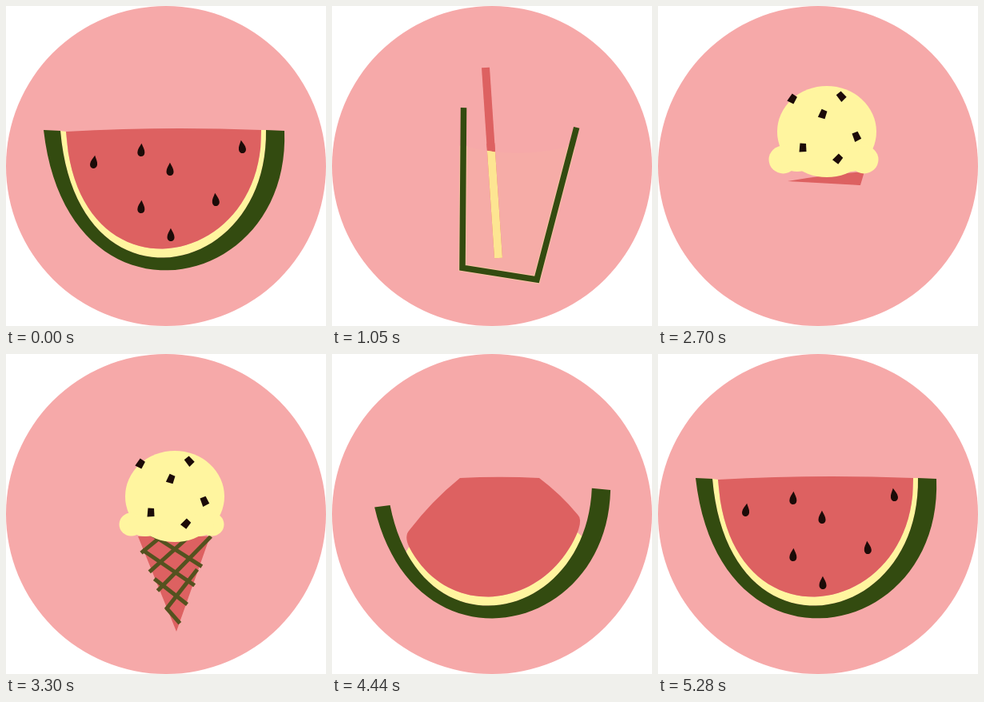
Write an HTML page with a canvas that moves like this. It is 400 by 400 pixels and loops after 5520 ms.

```html
<!DOCTYPE html>
<html lang="en">
<head>
<meta charset="utf-8">
<title>Summer treats</title>
<style>
  html, body { margin: 0; width: 100%; height: 100%; overflow: hidden; background: #fff; }
  canvas { display: block; width: 100vmin; height: 100vmin; }
</style>
</head>
<body>
<canvas id="stage" width="400" height="400"></canvas>
<script>
const ctx = document.getElementById('stage').getContext('2d');
const LOOP = 5520;
const PINK = '#f6a9a9', RED = '#dd6161', GREEN = '#334b10', CREAM = '#fff59f', DARK = '#1c0b08';
const STRAW_WET = '#fde592', WAFFLE = '#54521f';

// Bezier curves from the right tip to the left tip.
const RIND = [[348, 156], [356, 362], [76, 414], [47, 155]];
const LINER = [[325, 155], [328, 344], [88, 390], [68, 156]];
const FLESH = [[319, 155], [322, 332], [88, 372], [75, 157]];

const SEEDS = [[110, 195], [169, 180], [205, 204], [295, 176], [169, 251], [262, 242], [206, 286]];
const CHIPS = [[168, 137, 30], [229, 134, -42], [206, 156, 20], [181, 198, 0], [248, 184, -25], [225, 212, 40]];

// Timing
const ramp = (t, a, b) => Math.min(1, Math.max(0, (t - a) / (b - a)));
const ease = (t, a, b) => (1 - Math.cos(Math.PI * ramp(t, a, b))) / 2;
const bump = (t, a, b) => Math.sin(Math.PI * ramp(t, a, b));
function overshoot(t, a, b, amount = 1.7) {
  const k = ramp(t, a, b) - 1;
  return 1 + (amount + 1) * k ** 3 + amount * k * k;
}

// Geometry
const lerp = (a, b, k) => a + (b - a) * k;
const mix = (p, q, k) => p.map((v, i) => lerp(v, q[i], k));

function bezier([a, b, c, d], s) {
  const ab = mix(a, b, s), bc = mix(b, c, s), cd = mix(c, d, s);
  return mix(mix(ab, bc, s), mix(bc, cd, s), s);
}

function sample(fn, from, to, count = 48) {
  return Array.from({ length: count + 1 }, (_, i) => fn(lerp(from, to, i / count)));
}

// Drawing
function trace(points) {
  ctx.beginPath();
  points.forEach(p => ctx.lineTo(...p));
}

function fill(points, color) {
  trace(points);
  ctx.fillStyle = color;
  ctx.fill();
}

function stroke(points, color, width) {
  trace(points);
  ctx.strokeStyle = color;
  ctx.lineWidth = width;
  ctx.stroke();
}

function ellipse(x, y, rx, ry) {
  ctx.beginPath();
  ctx.ellipse(x, y, rx, ry, 0, 0, 7);
  ctx.fill();
}

function placed(x, y, degrees, size, draw) {
  if (size <= 0) return;
  ctx.save();
  ctx.translate(x, y);
  ctx.rotate(degrees * Math.PI / 180);
  ctx.scale(size, size);
  draw();
  ctx.restore();
}

function inside(path, draw) {
  ctx.save();
  ctx.clip(path);
  draw();
  ctx.restore();
}

function bulgeTo(p, q, amount) {
  const [mx, my] = mix(p, q, .5);
  ctx.quadraticCurveTo(mx + (q[1] - p[1]) * amount, my - (q[0] - p[0]) * amount, ...q);
}

// Hidden share of a curve at its [left, right] ends: closed, partly open, then whole.
function hidden(t, begin, partial, end) {
  if (t < 1000) return [.5, .5].map(v => v * ease(t, 100, 430));
  return mix([.5, .5], partial, ease(t, begin, 4440)).map(v => v * (1 - ease(t, 4440, end)));
}

function band(outer, inner, [left, right], color) {
  if (right + left >= 1) return;
  const edge = curve => sample(s => bezier(curve, s), right, 1 - left);
  fill([...edge(outer), ...edge(inner).reverse()], color);
}

// Top edge [x, y, x, y], apex and how far the cone has spread into a melon slice.
function fleshPose(t) {
  const slice = [75, 157, 319, 155];
  if (t < 430) {
    return { top: mix(slice, [202, 303, 202, 303], ease(t, 120, 430)), apex: [202, 303], spread: 1 };
  }
  const speck = Array(6).fill(212), sliver = [162, 219, 258, 207, 253, 224], cone = [165, 228, 255, 228, 213, 347];
  const grown = mix(mix(speck, sliver, ease(t, 2550, 2700)), cone, overshoot(t, 2740, 3120, .9));
  const spread = ease(t, 3600, 4050);
  const raised = mix(grown.slice(0, 4), [160, 155, 259, 155], spread);
  return { top: mix(raised, slice, ease(t, 4440, 4670)), apex: grown.slice(4), spread };
}

function drawFlesh(t) {
  if (t > 430 && t < 2550) return;
  const { top, apex, spread } = fleshPose(t);
  const [left, right] = hidden(t, 3700, [.128, .105], 4670);
  const arc = sample(s => mix(apex, bezier(FLESH, s), spread), right, 1 - left);
  const n = arc.length - 1;
  const tl = top.slice(0, 2), tr = top.slice(2);
  const shoulderR = mix(arc[0], tr, .1), shoulderL = mix(arc[n], tl, .1);
  ctx.beginPath();
  ctx.moveTo(...tl);
  bulgeTo(tl, tr, .024);
  bulgeTo(tr, shoulderR, .06 * spread);
  ctx.quadraticCurveTo(...arc[0], ...arc[2]);
  arc.slice(2, n - 1).forEach(p => ctx.lineTo(...p));
  ctx.quadraticCurveTo(...arc[n], ...shoulderL);
  bulgeTo(shoulderL, tl, .06 * spread);
  ctx.fillStyle = RED;
  ctx.fill();
}

function drawRind(t) {
  const flare = bump(t, 4720, 4980);
  const bend = ([a, b, c, [x, y]]) => [a, b, c, [x - 17 * flare, y - 18 * flare]];
  const ends = t < 1000 ? [0, 0] : hidden(t, 3950, [.05, .023], 4620);
  band(bend(RIND), bend(LINER), ends, GREEN);
}

function drawSeeds(t) {
  SEEDS.forEach(([x, y], i) => {
    const delay = i * 25;
    const size = t < 1000 ? 1 - ease(t, 60 + delay / 2, 230 + delay / 2) : overshoot(t, 4740 + delay, 5060 + delay);
    placed(x, y, (200 - x) * .09, size, () => {
      ctx.beginPath();
      ctx.moveTo(0, -8.3);
      ctx.bezierCurveTo(2, -4, 4.5, -1, 4.5, 3);
      ctx.bezierCurveTo(4.5, 9.8, -4.5, 9.8, -4.5, 3);
      ctx.bezierCurveTo(-4.5, -1, -2, -4, 0, -8.3);
      ctx.fillStyle = DARK;
      ctx.fill();
    });
  });
}

// The glass leans while it forms, springs upright, and opens before it leaves.
function glassAt(t) {
  const after = Math.max(0, t - 1050);
  const lean = ease(t, 600, 1050) * Math.exp(-after / 80) * Math.cos(after / 60);
  const open = 20 * ramp(t, 1650, 2050) ** 2 * (1 - ease(t, 2050, 2200));
  return {
    lean,
    width: 9 - 1.5 * lean,
    corners: [[284 + 22 * lean + open, 141 + 11 * lean], [256, 342],
              [163, 342 - 15 * lean], [128 + 37 * lean - open, 138 - 11 * lean]]
  };
}

function drawGlass(t, { corners, width }) {
  const morph = ease(t, 150, 640);
  const cut = .1 * (ease(t, 150, 600) - ease(t, 600, 850)) + .5 * ease(t, 2000, 2400);
  if (cut >= .5) return;
  const wall = s => {
    const i = Math.min(2, Math.floor(s * 3 + 1e-6));
    return mix(corners[i], corners[i + 1], s * 3 - i);
  };
  const point = s => mix(mix(bezier(RIND, s), bezier(LINER, s), .5), wall(s), morph);
  const base = cut < 1 / 3 ? corners.slice(1, 3) : [];
  const points = morph < 1 ? sample(point, cut, 1 - cut) : [point(cut), ...base, point(1 - cut)];
  stroke(points, GREEN, lerp(19, width, morph));
}

function liquidAt(t, { lean, corners: [rightRim, rightBase, leftBase, leftRim] }) {
  const level = .7 * ease(t, 800, 1050) * (1 - ease(t, 1780, 2260));
  const l = mix(leftBase, leftRim, level * (1.02 + .07 * lean));
  const r = mix(rightBase, rightRim, level * (.98 + .28 * lean));
  const dip = 18 * ramp(level, 0, .3);
  const path = new Path2D();
  path.moveTo(...l);
  path.quadraticCurveTo((l[0] + r[0]) / 2, (l[1] + r[1]) / 2 + dip, ...r);
  path.lineTo(...rightBase);
  path.lineTo(...leftBase);
  path.closePath();
  const alpha = level > 0 ? .04 + .41 * ease(t, 1060, 1300) : 0;
  return { path, alpha, sides: [l, leftBase, rightBase, r] };
}

function drawStraw(t, color) {
  const straight = [208, 315, 199, 182, 192, 77], bent = [211, 336, 275, 130, 327, 107];
  const bend = overshoot(t, 1070, 1400);
  const hop = 14 * bump(t, 1880, 2140);
  const leave = ease(t, 2120, 2400);
  let pose = mix([209, 318, 209, 318, 209, 318], straight, ease(t, 760, 1030));
  pose = mix(pose, bent, bend).map((v, i) => i === 3 || i === 5 ? v - hop : v);
  const [bx, by, kx, ky, tx, ty] = mix(pose, [235, 195, 235, 195, 235, 195], leave);
  const dx = tx - kx, dy = ty - ky, len = Math.hypot(dx, dy);
  if (len < 1) return;
  const width = 10 * (1 - leave), nx = -dy / len, ny = dx / len;
  const near = width / 2, far = near + 2.4 * bend * (1 - leave);
  stroke([[bx, by], [kx, ky], [kx + dx * .1, ky + dy * .1]], color, width);
  fill([[kx + nx * near, ky + ny * near], [tx + nx * far, ty + ny * far],
        [tx - nx * far, ty - ny * far], [kx - nx * near, ky - ny * near]], color);
}

function drawIce(t, x, y, angle, delay, color, alpha = 1) {
  const arrive = overshoot(t, 1200 + delay, 1450 + delay), leave = ease(t, 1900, 2160 + delay);
  placed(x, y + 14 * (1 - arrive) + 30 * leave, angle, t < 1200 + delay ? 0 : arrive * (1 - leave), () => {
    ctx.globalAlpha = alpha;
    ctx.fillStyle = color;
    ctx.beginPath();
    ctx.roundRect(-18.5, -18.5, 37, 37, [7, 7, 12, 12]);
    ctx.fill();
  });
}

function drawDrink(t) {
  const glass = glassAt(t), liquid = liquidAt(t, glass);
  const topIce = color => drawIce(t, 231, 212, 20, 0, color);
  topIce('#fff');
  if (liquid.alpha > 0) {
    ctx.globalAlpha = Math.min(1, liquid.alpha * 8);
    stroke(liquid.sides, CREAM, glass.width + 2);
    ctx.globalAlpha = liquid.alpha;
    ctx.fillStyle = '#fff082';
    ctx.fill(liquid.path);
    ctx.globalAlpha = 1;
  }
  inside(liquid.path, () => topIce('#fff3a6'));
  drawStraw(t, RED);
  inside(liquid.path, () => drawStraw(t, STRAW_WET));
  drawIce(t, 180, 238, 8, 30, '#fff', .4);
  drawIce(t, 218, 254, -5, 15, '#fffde8');
  drawGlass(t, glass);
}

// Two families of bars, each joining the cone's left edge to its right edge.
function drawLattice(t) {
  const progress = ease(t, 2980, 3380) - ease(t, 3570, 3740);
  if (progress <= 0) return;
  const left = y => [165 + (y - 228) * .4, y], right = y => [255 - (y - 228) * .353, y];
  const bar = (from, to, order) => {
    const k = Math.min(1.03, progress * 2 - order / 8);
    if (k > 0) stroke([mix(from, to, -.03), mix(from, to, k)], WAFFLE, 5);
  };
  const belowScoop = new Path2D();
  belowScoop.rect(0, 226, 400, 174);
  inside(belowScoop, () => {
    for (let i = 0; i < 4; i++) {
      bar(left(210 + 36 * i), right(264 + 24 * i), 2 * i);
      bar(left(246 + 24 * i), right(158 + 36 * i), 2 * i + 1);
    }
  });
}

function drawCream(t) {
  if (t < 2230 || t > 4040) return;
  const drop = overshoot(t, 2800, 3120, 2.5);
  const puff = 1.2 - .2 * drop;
  const lift = 21 * (drop - 1) - 80 * bump(t, 3620, 3960);
  const size = overshoot(t, 2230, 2640, 1) * (1 - ease(t, 3780, 4040));
  placed(211, 178 + lift, 0, size, () => {
    ctx.fillStyle = CREAM;
    ellipse(0, 0, 62, 57);
    for (const side of [-1, 1]) {
      ellipse(-4 + 50.5 * side, 35, 15 * puff, 14.5 * puff);
      ellipse(-4 + 33 * side, 36, 20, 14);
    }
    CHIPS.forEach(([x, y, angle], i) => {
      placed(x - 211, y - 178, angle, ease(t, 2380 + i * 25, 2540 + i * 25), () => {
        fill([[-3.5, -5.5], [4, -5], [4.5, 5], [-4.5, 5.5]], DARK);
      });
    });
  });
}

function draw(t) {
  ctx.clearRect(0, 0, 400, 400);
  ctx.fillStyle = PINK;
  ellipse(200, 200, 200, 200);

  const melon = t < 500 || t > 3900;
  if (melon) band(LINER, FLESH, hidden(t, 4000, [.16, .145], 4640), CREAM);
  if (t > 150 && t < 2400) drawDrink(t);
  if (t <= 150 || t > 3900) drawRind(t);
  drawFlesh(t);
  drawLattice(t);
  drawCream(t);
  if (melon) drawSeeds(t);
}

const start = performance.now();
function tick() {
  draw((performance.now() - start) % LOOP);
  requestAnimationFrame(tick);
}
tick();
</script>
</body>
</html>
```
